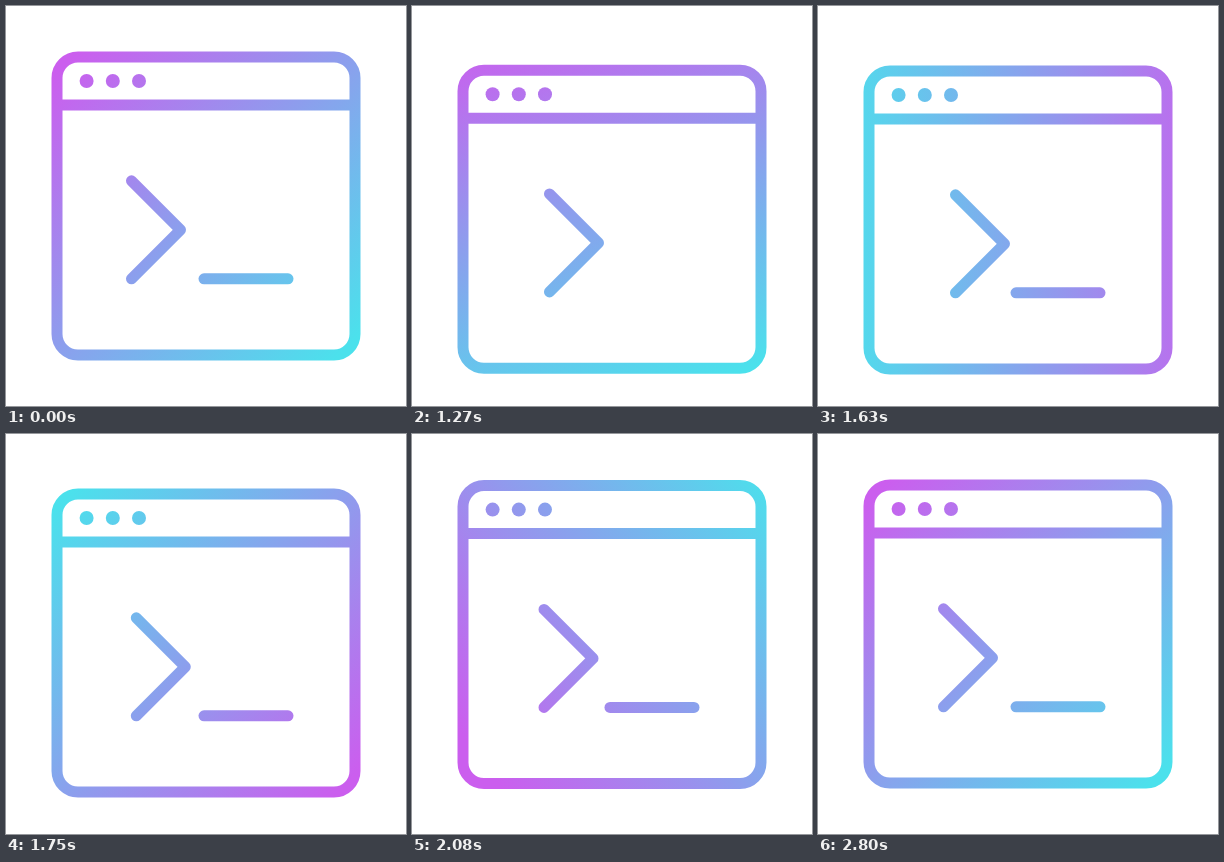
Animation, 400 px wide and 400 px high, one loop 2.83 s. Source, as an HTML page with a canvas:

```html
<!DOCTYPE html>
<html lang="en">
<head>
<meta charset="utf-8">
<title>Terminal icon</title>
<style>
html, body { margin: 0; width: 100%; height: 100%; overflow: hidden; background: #fff; }
canvas { display: block; width: 400px; height: 400px; }
</style>
</head>
<body>
<canvas id="stage" width="400" height="400"></canvas>
<script>
const ctx = document.getElementById('stage').getContext('2d');
const LOOP = 2830, HOLD = 1000, STEP = 30, SPAN = 1800;
const clamp = v => Math.min(1, Math.max(0, v));
const smooth = v => v * v * (3 - 2 * v);

// Cubic bezier easing with handles (a, 0) and (b, 1).
function ease(x, a, b) {
  x = clamp(x);
  let lo = 0, hi = 1;
  for (let i = 0; i < 30; i++) {
    const s = (lo + hi) / 2, r = 1 - s;
    if (3 * a * s * r * r + 3 * b * s * s * r + s * s * s < x) lo = s;
    else hi = s;
  }
  return smooth((lo + hi) / 2);
}

function drop(t) {
  const p = t < 400 ? ease(t / 400, 0.333, 0.758)
                    : 1 - ease((t - 400) / 810, 0.333, 0.449);
  return 18.9 * p;
}

// The prompt arrow slides out and back twice.
function slide(t) {
  const p = (t % 900) / 450;
  return 18.5 * smooth(p < 1 ? p : 2 - p);
}

function cursorOn(t) {
  const p = t % 900;
  return p < 225 || p >= 450;
}

function paint(t) {
  const angle = (ease(t / SPAN, 0.33, 0.46) * 360 - 135) * Math.PI / 180;
  const away = Math.sin(Math.PI * clamp(t / SPAN));
  const cx = 200 + 17 * away, cy = 200 - 12 * away;
  const dx = 200 * Math.cos(angle), dy = 200 * Math.sin(angle);
  const fill = ctx.createLinearGradient(cx + dx, cy + dy, cx - dx, cy - dy);
  fill.addColorStop(0, '#cb5eee');
  fill.addColorStop(1, '#4be1ec');
  return fill;
}

function line(...pts) {
  ctx.beginPath();
  for (let i = 0; i < pts.length; i += 2) ctx.lineTo(pts[i], pts[i + 1]);
  ctx.stroke();
}

function draw(t) {
  ctx.fillStyle = '#fff';
  ctx.fillRect(0, 0, 400, 400);
  ctx.fillStyle = ctx.strokeStyle = paint(t);
  ctx.lineWidth = 11;
  ctx.lineJoin = 'round';

  // Shapes are offset by hand so the gradient stays fixed to the stage.
  const y = drop(t), x = slide(t);
  ctx.beginPath();
  ctx.roundRect(51, 51 + y, 298, 298, 21);
  ctx.stroke();
  ctx.lineCap = 'butt';
  line(51, 99 + y, 349, 99 + y);

  for (let i = 0; i < 3; i++) {
    ctx.beginPath();
    ctx.arc(80.6 + 26.2 * i, 75 + y, 7, 0, 7);
    ctx.fill();
  }

  ctx.lineCap = 'round';
  line(125.5 + x, 174.8 + y, 174.5 + x, 223.8 + y, 125.5 + x, 272.8 + y);
  if (cursorOn(t)) line(198, 272.8 + y, 282, 272.8 + y);
}

const start = performance.now();
function tick() {
  const t = (performance.now() - start) % LOOP;
  const run = Math.floor((t - HOLD) / STEP) * STEP;
  draw(Math.min(SPAN, Math.max(0, run)));
  requestAnimationFrame(tick);
}
tick();
</script>
</body>
</html>
```
